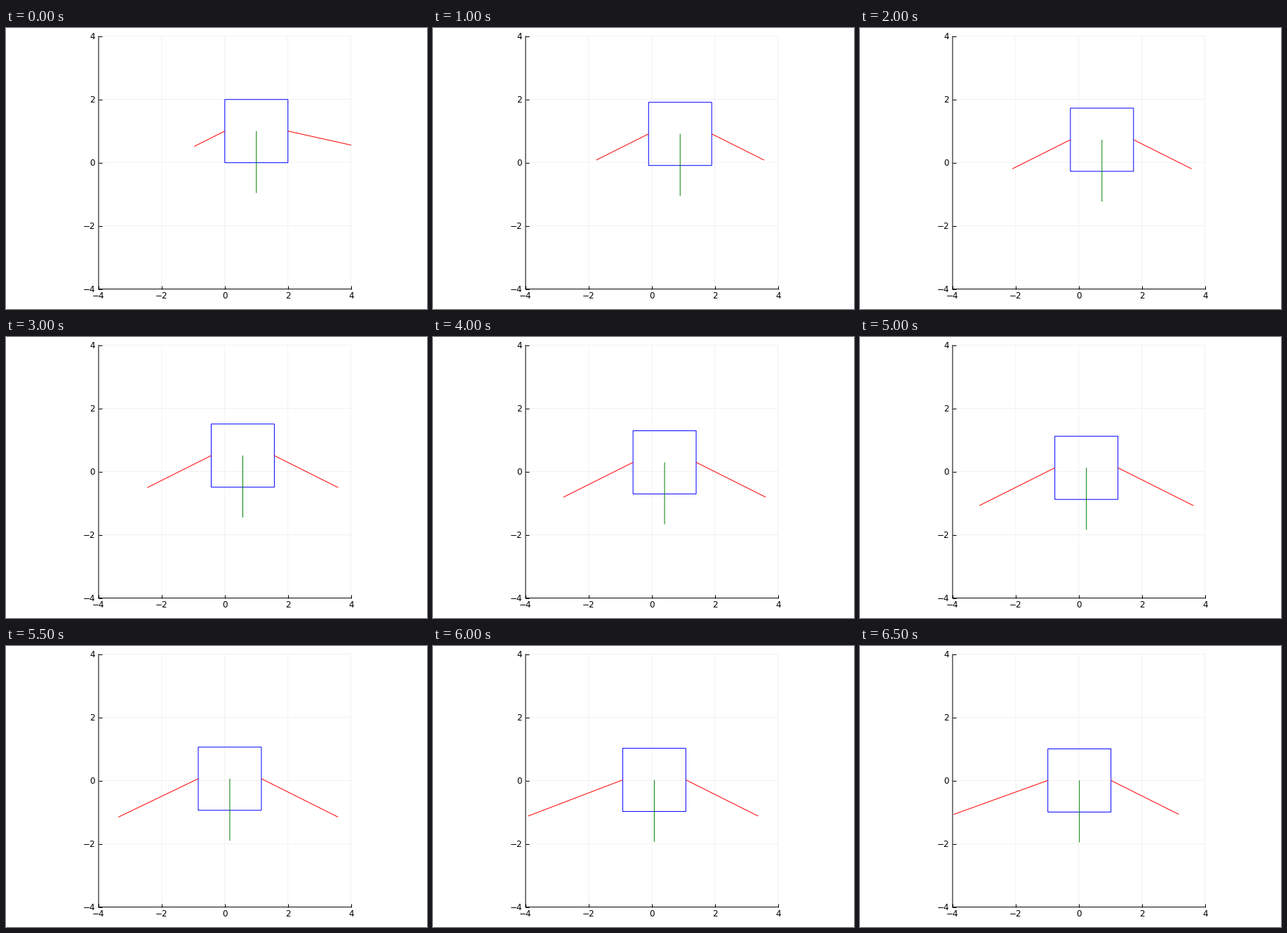
Recreate the animation shown at these times as a matplotlib script. Size 600 by 400 pixels, loop 7000 ms.

```python
import numpy as np
import matplotlib.pyplot as plt
from matplotlib.animation import FuncAnimation

W, H, DPI = 600, 400, 100
FRAMES, STEP_MS = 14, 500
LEFT, TOP, SIDE = 131.95, 11.81, 359.8   # plot area in pixels
PX = 72 / DPI                            # one pixel in points
DT, GRAVITY, SCALE = 0.1, 9.8, 5         # SCALE: force per unit drawn
FRICTION = 0.5

plt.rcParams["path.snap"] = False
plt.rcParams["font.family"] = "DejaVu Sans"


def ramp(steps, values):
    return np.interp(np.arange(FRAMES), steps, values)


# A block held by a friction grip on both sides: lift is the vertical pull
# of each side, push the sideways surplus that moves and then brakes it.
lift = ramp([0, 1, 2, 10, 11, 13], [0.485, 0.69, 0.83, 1.195, 1.215, 1.075])
push = ramp([0, 1, 2, 10, 11, 12, 13], [-1.22, -0.424, 0, 0, 0.1, 0.71, 0.834])
reach_left = lift / FRICTION + np.maximum(push, 0)
reach_right = lift / FRICTION + np.maximum(-push, 0)


def integrate(start, accel):
    """Positions at each step under piecewise constant acceleration."""
    speed = np.cumsum(accel) * DT - accel * DT
    moves = speed * DT + accel * DT ** 2 / 2
    return start + np.cumsum(moves) - moves


body_x = integrate(1, SCALE * push)
body_y = integrate(1, 2 * SCALE * lift - GRAVITY)

fig = plt.figure(figsize=(W / DPI, H / DPI), dpi=DPI, facecolor="white")
ax = fig.add_axes([LEFT / W, 1 - (TOP + SIDE) / H, SIDE / W, SIDE / H])
ax.set(xlim=(-4, 4), ylim=(-4, 4))
ticks = range(-4, 5, 2)
ax.set_xticks(ticks, [])
ax.set_yticks(ticks, [])
ax.tick_params(direction="in", length=4.7 * PX, width=PX)
for name, spine in ax.spines.items():
    spine.set_linewidth(PX)
    spine.set_visible(name in ("left", "bottom"))

for v in ticks:
    for xs, ys in (([v, v], [-4, 4]), ([-4, 4], [v, v])):
        ax.plot(xs, ys, color="black", alpha=0.1, lw=0.5 * PX,
                clip_on=False, zorder=0.5)
    label = str(v).replace("-", "\u2212")
    style = dict(textcoords="offset points", fontsize=12 * PX,
                 va="baseline", annotation_clip=False)
    ax.annotate(label, (v, -4), (0, -13.7 * PX), ha="center", **style)
    ax.annotate(label, (-4, v), (-5 * PX, -4.4 * PX), ha="right", **style)


def stroke(color):
    return ax.plot([], [], color=color, lw=PX, zorder=3,
                   solid_capstyle="butt", solid_joinstyle="miter")[0]


box = stroke("blue")
left, right = stroke("red"), stroke("red")
weight = stroke("green")


def draw(i):
    x, y = body_x[i], body_y[i]
    foot = y - lift[i]
    box.set_data([x - 1, x + 1, x + 1, x - 1, x - 1],
                 [y - 1, y - 1, y + 1, y + 1, y - 1])
    left.set_data([x - 1, x - 1 - reach_left[i]], [y, foot])
    right.set_data([x + 1, x + 1 + reach_right[i]], [y, foot])
    weight.set_data([x, x], [y, y - GRAVITY / SCALE])
    return box, left, right, weight


anim = FuncAnimation(fig, draw, frames=FRAMES, interval=STEP_MS,
                     repeat=True, repeat_delay=0)
plt.show()
```
